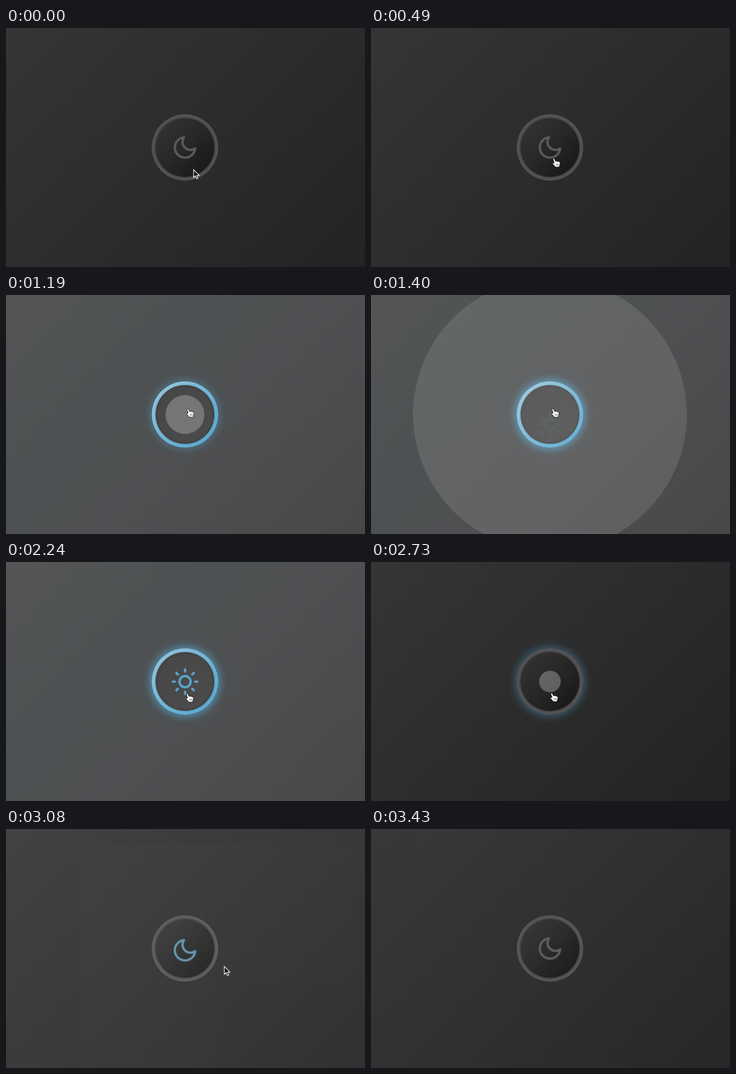
An HTML page for the animation above (3.64 s loop, 660 px wide and 440 px high).

```html
<!DOCTYPE html>
<html lang="en">
<head>
<meta charset="utf-8">
<title>Theme toggle</title>
<style>
  :root { --loop: 3640ms; --blue: #5aa9d0; --gray: #5c5c5e; }
  html, body { margin: 0; width: 100%; height: 100%; overflow: hidden; background: #2b2b2b; }
  .stage {
    position: relative; width: 660px; height: 440px; overflow: hidden;
    background: linear-gradient(135deg, #353535, #2c2c2c 50%, #232323);
  }
  .stage > * { position: absolute; }
  .stage > svg { left: 0; top: 0; }

  .sky {
    inset: 0;
    background: linear-gradient(135deg, #555, #4e5253 27%, #4e4f51 60%, #484848);
  }
  .sky, .knob.day { opacity: 0; animation: day var(--loop) step-end infinite; }

  .glow, .knob { left: 268px; top: 159px; width: 122px; height: 122px; border-radius: 50%; }
  .glow {
    opacity: 0;
    box-shadow: 0 0 15px 3px rgba(86, 172, 218, .75);
    animation: glow var(--loop) linear infinite;
  }
  .knob { background: linear-gradient(#545456, #535356); }
  .knob::after {
    content: ""; position: absolute; inset: 7px; border-radius: 50%;
    background: linear-gradient(135deg, #313131 15%, #272727 50%, #191919 88%);
    box-shadow: 0 0 3px 1px rgba(28, 28, 28, .55);
  }
  .knob.day { background: linear-gradient(135deg, #93c3da 12%, #74b6d6 50%, #5aaad1 88%); }
  .knob.day::after {
    background: linear-gradient(135deg, #474747, #4b4b4b);
    box-shadow: 0 0 3px rgba(50, 80, 95, .6), inset 0 0 5px rgba(0, 0, 0, .3);
  }

  .icon { fill: none; stroke-width: 2; stroke-linecap: round; stroke-linejoin: round; }
  .moon { stroke: var(--gray); animation: moon var(--loop) linear infinite; }
  .sun { stroke: var(--blue); opacity: 0; animation: sun var(--loop) linear infinite; }

  .ripple {
    left: -171px; top: -280px; width: 1000px; height: 1000px;
    border-radius: 50%; background: #fff; opacity: 0;
    animation: grow var(--loop) infinite, fade var(--loop) linear infinite;
    animation-delay: 1058ms;
  }
  .ripple.late { animation-delay: 2640ms; }

  .pointer { animation: move var(--loop) linear infinite; }
  .hand { fill: #fff; stroke: #111; stroke-width: .9; animation: hand var(--loop) step-end infinite; }
  .arrow { fill: #111; stroke: #fff; stroke-width: 1.2; animation: arrow var(--loop) step-end infinite; }
  .press { fill: none; stroke: #ddd; stroke-width: .9; animation: press var(--loop) step-end infinite; }

  @keyframes day { 0% { opacity: 0 } 29.07% { opacity: 1 } 72.53%, 100% { opacity: 0 } }
  @keyframes glow {
    0%, 29.07% { opacity: 0 }
    35.9%, 72.53% { opacity: 1 }
    78%, 100% { opacity: 0 }
  }
  @keyframes moon {
    0%, 29.07% { opacity: 1; transform: none; stroke: var(--gray) }
    30.5%, 77% { opacity: 0; transform: translateY(20px); stroke: var(--blue) }
    80.77% { opacity: 1; transform: translateY(10px); stroke: var(--blue) }
    86.5% { opacity: 1; transform: none }
    92%, 100% { opacity: 1; transform: none; stroke: var(--gray) }
  }
  @keyframes sun {
    0%, 38% { opacity: 0; transform: translateY(20px); animation-timing-function: ease-out }
    47%, 72.53% { opacity: 1; transform: none }
    74.5%, 100% { opacity: 0; transform: none }
  }
  @keyframes grow {
    0% { transform: scale(0); animation-timing-function: cubic-bezier(.55, .07, .68, .38) }
    12.83%, 100% { transform: none }
  }
  @keyframes fade {
    0% { opacity: .34 }
    2.5% { opacity: .28 }
    8.24% { opacity: .134 }
    9.4% { opacity: .116 }
    12.1% { opacity: .07 }
    16.5% { opacity: .04 }
    21.7% { opacity: .02 }
    27.4%, 100% { opacity: 0 }
  }
  @keyframes move {
    0% { transform: translate(345px, 261px) }
    1.92% { transform: translate(344px, 256px) }
    3.85% { transform: translate(342px, 248px) }
    9.6% { transform: translate(336px, 248px) }
    13.46%, 21.15% { transform: translate(336px, 240px) }
    26.9%, 44.2% { transform: translate(334px, 209px) }
    59.6% { transform: translate(333px, 241px) }
    61.5%, 65.4% { transform: translate(333px, 242px) }
    67.3%, 82.7% { transform: translate(332px, 241px) }
    92.3%, 100% { transform: translate(675px, 300px) }
  }
  @keyframes hand { 0% { opacity: 0 } 9.6% { opacity: 1 } 84%, 100% { opacity: 0 } }
  @keyframes arrow { 0% { opacity: 1 } 9.6% { opacity: 0 } 84%, 100% { opacity: 1 } }
  @keyframes press {
    0% { opacity: 0 } 3.8% { opacity: 1 } 11.5% { opacity: 0 }
    26.9% { opacity: 1 } 30.7% { opacity: 0 }
    67.3% { opacity: 1 } 72.5%, 100% { opacity: 0 }
  }
</style>
</head>
<body>
<div class="stage">
  <div class="sky"></div>
  <div class="glow"></div>
  <div class="knob"></div>
  <div class="knob day"></div>

  <svg width="660" height="440">
    <g class="moon icon">
      <path transform="translate(304 195) scale(2.083)"
            d="M21 12.79A9 9 0 1 1 11.21 3 7 7 0 0 0 21 12.79z"/>
    </g>
    <g class="sun icon">
      <g transform="translate(304.5 195.5) scale(2.06)">
        <circle cx="12" cy="12" r="5"/>
        <path d="M12 1v2M12 21v2M1 12h2M21 12h2M4.22 4.22l1.42 1.42M18.36 18.36l1.42 1.42M4.22 19.78l1.42-1.42M18.36 5.64l1.42-1.42"/>
      </g>
    </g>
  </svg>

  <div class="ripple"></div>
  <div class="ripple late"></div>

  <svg width="660" height="440">
    <g class="pointer">
      <g class="press">
        <circle cx="1.5" r="31.6"/>
        <circle cx="1.5" r="30.4" stroke="#222"/>
        <circle cx="1.5" r="29.3"/>
      </g>
      <path class="arrow" d="M0 0V14.5L3.3 11.4 5.6 16.8 8 15.8 5.8 10.6H10.3Z"/>
      <g class="hand">
        <path d="M-1.4 1.4Q0-1 1.5 1.2L3.4 5.6Q5 4 6.2 5.7 7.9 4.5 9 6.3 11 5.4 11.6 8L11.2 12 9.8 16H3Q2 13.4-2 10.6-3 8.3 0 8.6L1 9Z"/>
        <path d="M4.6 9.5v4M6.7 9.5v4M8.8 9.5v4" stroke-width=".6"/>
      </g>
    </g>
  </svg>
</div>
<script>
  const LOOP = 3640, STEP = 70;
  const start = performance.now();
  const anims = document.getAnimations();
  anims.forEach(a => a.pause());

  function tick() {
    const t = (performance.now() - start) % LOOP;
    const held = Math.floor(t / STEP) * STEP + 1;
    anims.forEach(a => { a.currentTime = held; });
    requestAnimationFrame(tick);
  }
  tick();
</script>
</body>
</html>
```
